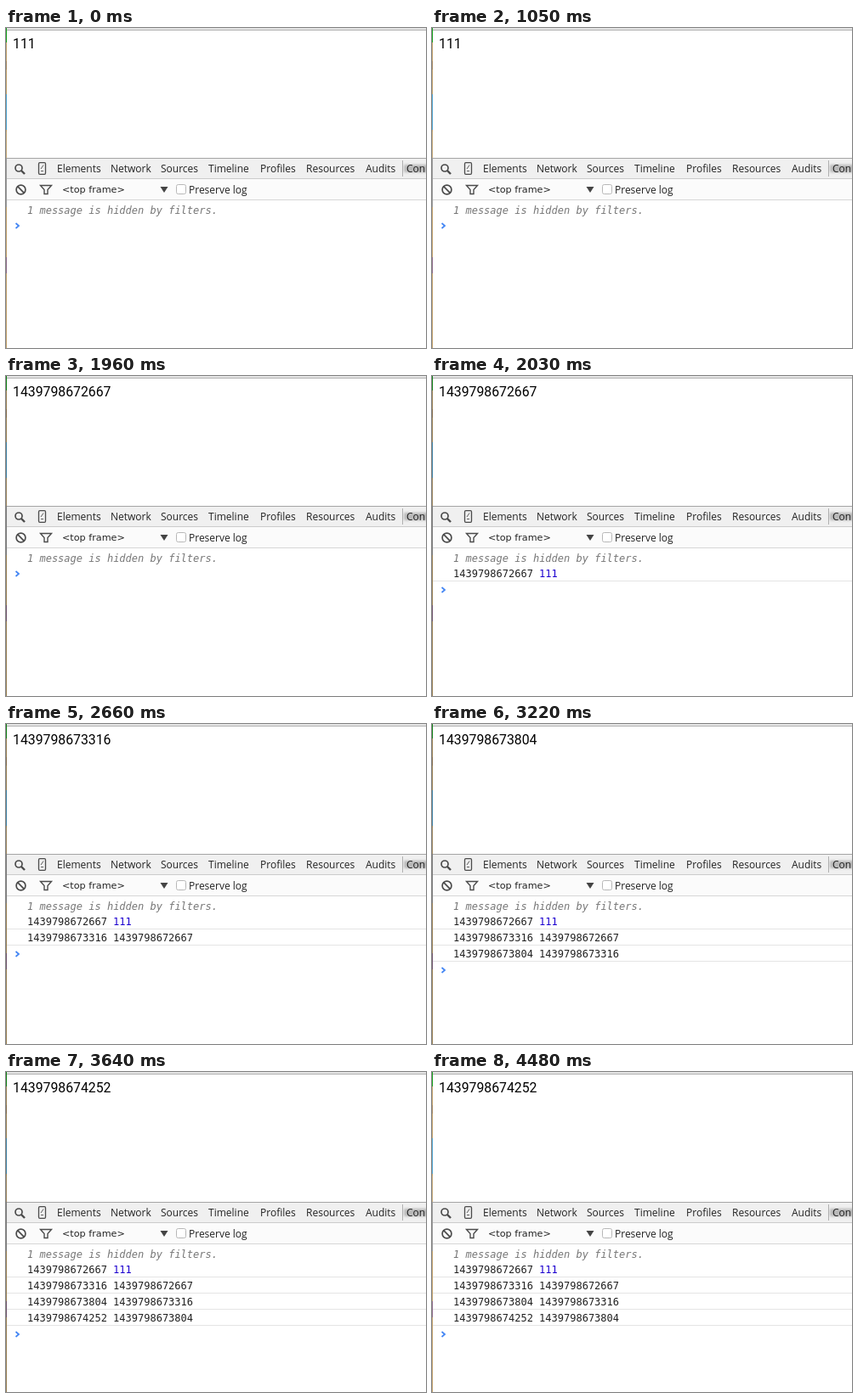
Write an HTML page that moves like this. It is 494 px wide and 377 px high and loops after 4.55 s.

```html
<!DOCTYPE html>
<html lang="en">
<head>
<meta charset="utf-8">
<title>Console log</title>
<style>
  html, body { margin: 0; width: 100%; height: 100%; overflow: hidden; background: #fff; }
  svg { display: block; width: 494px; height: 377px; }
  text { white-space: pre; }
  .ui { font: 500 12px "Open Sans", "Noto Sans", sans-serif; fill: #222; }
  .mono { font: 12px "DejaVu Sans Mono", monospace; fill: #222; }
  .page { font: 15.8px Roboto, sans-serif; fill: #000; }
  .icon { fill: none; stroke: #4b4b4b; stroke-width: 1.7; }
</style>
</head>
<body>
<svg viewBox="0 0 494 377">
  <defs><filter id="soft" x="-30%" y="-60%" width="160%" height="220%"><feGaussianBlur stdDeviation="1.5"/></filter></defs>

  <rect width="494" height="2" fill="#e4e4e4"/>
  <rect y="2" width="494" height="1" fill="#b2b2b2"/>
  <g id="edge"></g>
  <text id="value" class="page" x="8" y="24"></text>

  <g id="tabs" class="ui">
    <rect x="1" y="153" width="493" height="25" fill="#f0f0f0"/>
    <path d="M1 153.5H494" stroke="#a5a5a5"/>
    <path d="M1 177.5H494" stroke="#cbcbcb"/>
    <rect x="468" y="161" width="30" height="9" fill="#b9b9b9" filter="url(#soft)"/>
    <path d="M466.5 156V175" stroke="#b0b0b0"/>
  </g>
  <g class="icon">
    <circle cx="15" cy="165" r="4"/>
    <path d="M18 168L22 172" stroke-width="2.4"/>
    <rect x="38.5" y="158.7" width="8" height="13.6" rx="1.3" stroke-width="1.3"/>
    <path d="M41 166L44 161.500M41 168.500H44" stroke-width=".9"/>
  </g>

  <rect x="1" y="178" width="493" height="24" fill="#fbfbfb"/>
  <path d="M1 202.500H494" stroke="#d6d6d6"/>
  <g class="icon">
    <circle cx="17.5" cy="190.500" r="5.400"/>
    <path d="M13.700 186.700L21.300 194.300"/>
    <path d="M40.500 185.500H53.500L49 190.500V195.500H45V190.500Z" stroke-width="1.4"/>
  </g>
  <text x="66" y="194" class="ui" style="font: 11.2px 'DejaVu Sans', sans-serif">&lt;top frame&gt;</text>
  <path d="M181.500 187H190.500L186 194Z" fill="#444"/>
  <rect x="200.500" y="184.500" width="11" height="11" rx="2" fill="#fff" stroke="#b8b8b8"/>
  <text x="215" y="195" class="ui">Preserve log</text>

  <text x="25" y="219" class="mono" style="font-style: italic; fill: #777">1 message is hidden by filters.</text>
  <g id="log"></g>
  <path id="prompt" d="M11.500 230L15 233L11.500 236" fill="none" stroke="#4285f4" stroke-width="1.7"/>
</svg>
<script>
const LOOP = 4550, ROW = 19;
const values = ["111", "1439798672667", "1439798673316", "1439798673804", "1439798674252"];
// The page text updates first; the console row follows.
const pageTimes = [1960, 2660, 3150, 3570];
const logTimes = [2030, 2660, 3220, 3640];

const byId = id => document.getElementById(id);

function add(parent, tag, attrs, content = "") {
  const node = document.createElementNS("http://www.w3.org/2000/svg", tag);
  for (const key in attrs) node.setAttribute(key, attrs[key]);
  node.textContent = content;
  parent.append(node);
  return node;
}

const tabs = { Elements: 60, Network: 123, Sources: 182, Timeline: 238,
  Profiles: 299, Resources: 353, Audits: 423, Console: 471 };
for (const name in tabs) add(byId("tabs"), "text", { x: tabs[name], y: 170 }, name);

// Sliver of the desktop along the left border.
const edge = [[0, "#c0a06a"], [0, "#16a01c", 17], [39, "#a88a62", 10], [78, "#4fa3cf", 42],
  [122, "#c4a878", 31], [153, "#9a9a9a", 58], [211, "#c0a06a", 56], [270, "#8d6a8a", 19]];
for (const [y, fill, height = 377] of edge) add(byId("edge"), "rect", { y, fill, width: 1, height });
const shade = add(byId("edge"), "rect", { width: 1, height: 377, fill: "#000" });

const rows = logTimes.map((_, i) => {
  const row = add(byId("log"), "g", { transform: `translate(0 ${i * ROW})` });
  add(row, "text", { x: 25, y: 237, class: "mono" }, values[i + 1]);
  add(row, "text", { x: 126.1, y: 237, class: "mono", style: i ? "" : "fill: #1c00cf" }, values[i]);
  add(row, "path", { d: "M1 241.5H494", stroke: "#e4e4e4" });
  return row;
});

function draw(now) {
  const t = now % LOOP;
  const passed = times => times.filter(time => t >= time).length;
  const logged = passed(logTimes);
  byId("value").textContent = values[passed(pageTimes)];
  rows.forEach((row, i) => row.setAttribute("visibility", i < logged ? "visible" : "hidden"));
  byId("prompt").setAttribute("transform", `translate(0 ${logged * ROW})`);
  shade.setAttribute("opacity", t < 1260 || t >= 4480 ? 0 : t < 1330 ? 0.1 : 0.2);
}

function tick(now) {
  draw(now);
  requestAnimationFrame(tick);
}
draw(0);
requestAnimationFrame(tick);
</script>
</body>
</html>
```
